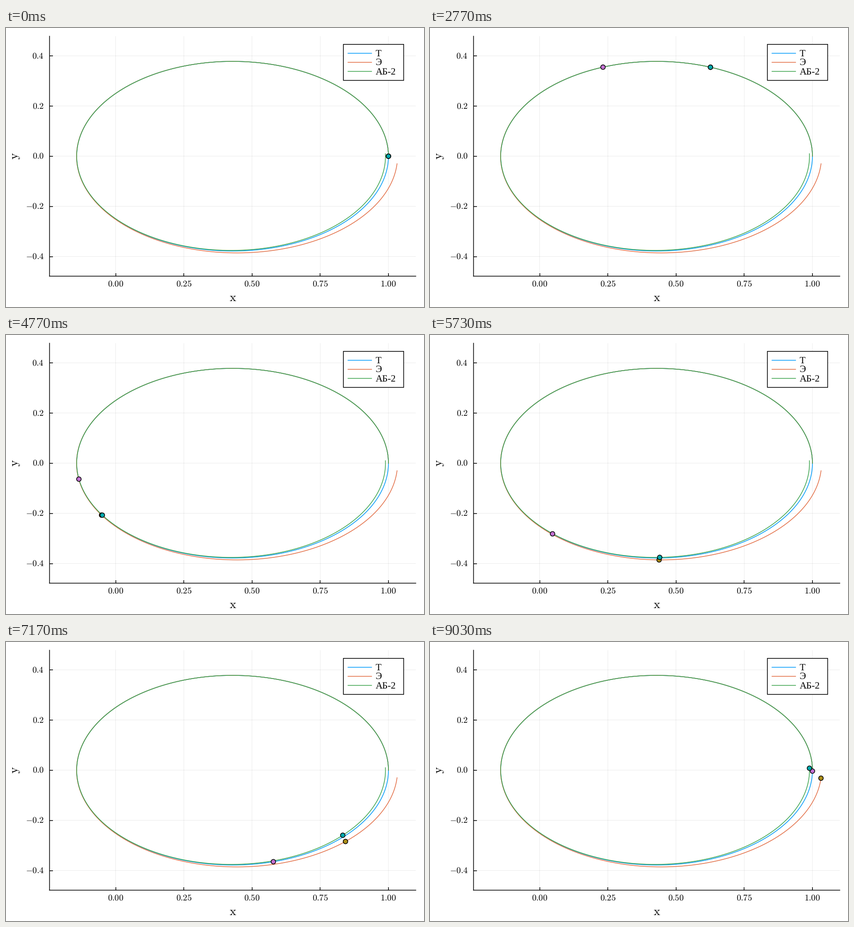
Animation, 917 px wide and 611 px high, one loop 9060 ms. Source, as a matplotlib script:

```python
import numpy as np
import matplotlib.pyplot as plt
from matplotlib.animation import FuncAnimation
from matplotlib.patches import Rectangle

W, H = 917, 611
LOOP_MS = 9060
STRIDE = 100              # integration steps per frame
DT = 1e-4
LW = 1.53

plt.rcParams.update({"mathtext.fontset": "cm", "path.snap": False,
                     "text.hinting": "none"})

# Kepler ellipse with the focus at the origin, starting at the far point
A, ECC = 4 / 7, 0.75
B = A * np.sqrt(1 - ECC**2)
PERIOD = 2 * np.pi * A**1.5
STEPS = int(PERIOD / DT)
FRAMES = STEPS // STRIDE + 1


def integrate(weight):
    """Two-step explicit scheme; weight 1 is the plain Euler method."""
    z, v = 1 + 0j, 0.5j
    path = [z]
    old_v, old_acc = v, -z / abs(z) ** 3
    for _ in range(STEPS):
        acc = -z / abs(z) ** 3
        dz = weight * v - (weight - 1) * old_v
        dv = weight * acc - (weight - 1) * old_acc
        old_v, old_acc = v, acc
        z += DT * dz
        v += DT * dv
        path.append(z)
    return np.array(path)


phase = 2 * np.pi * DT / PERIOD * np.arange(STEPS + 1)
exact = A * ECC + A * np.cos(phase) + 1j * B * np.sin(phase)
curves = [exact, integrate(1), integrate(5 / 3)]
names = ["Т", "Э", "АБ-2"]
line_colors = ["#009afa", "#e36f47", "#3ea44e"]
dot_colors = ["#c371d2", "#ac8e18", "#00aaae"]

# 72 dpi makes one point equal one pixel
fig = plt.figure(figsize=(W / 72, H / 72), dpi=72, facecolor="white")

left, right, top, bottom = 95.5, 899, 18, 543.5
ax = fig.add_axes([left / W, 1 - bottom / H, (right - left) / W, (bottom - top) / H])
for path, color in zip(curves, line_colors):
    ax.plot(path.real[::20], path.imag[::20], color=color, lw=LW)
dots = ax.scatter([1] * 3, [0] * 3, s=10**2, c=dot_colors, edgecolors="black",
                  linewidths=LW, zorder=5, clip_on=False)

xticks = [0, 0.25, 0.5, 0.75, 1]
yticks = [-0.4, -0.2, 0, 0.2, 0.4]
ax.set(xlim=(-0.2423, 1.1003), ylim=(-0.4782, 0.4782), xticks=xticks, yticks=yticks)
ax.tick_params(direction="in", length=7, width=LW, labelbottom=False, labelleft=False)
ax.grid(color="black", alpha=0.1, lw=0.76)
ax.set_axisbelow(True)
ax.spines[["top", "right"]].set_visible(False)
ax.spines[["left", "bottom"]].set_linewidth(LW)

# Overlay in pixel coordinates for labels and legend
page = fig.add_axes([0, 0, 1, 1])
page.set(xlim=(0, W), ylim=(H, 0))
page.axis("off")


def label(x, y, text, size=19.1, ha="center", **kw):
    page.text(x, y, text, size=size, ha=ha, va="baseline", color="black", **kw)


for t in xticks:
    label(240.5 + 598.5 * t, 567, f"${t:.2f}$")
for t in yticks:
    label(83.2, 287 - 549.5 * t, f"${t:.1f}$", ha="right")
label(497.3, 597.5, r"$\mathrm{x}$", size=26.3)
label(25.3, 280.5, r"$\mathrm{y}$", size=26.3, rotation=90, rotation_mode="anchor")

page.add_patch(Rectangle((740.2, 35.8), 132.2, 78.9, fc="white", ec="black", lw=LW))
for i, (name, color) in enumerate(zip(names, line_colors)):
    y = 55.4 + 19.8 * i
    page.plot([749.5, 802.8], [y, y], color=color, lw=LW, solid_capstyle="butt")
    label(811, y + 6.7, name, size=21, ha="left", family="Liberation Serif")


def update(n):
    now = [path[n * STRIDE] for path in curves]
    dots.set_offsets([(z.real, z.imag) for z in now])
    return dots,


anim = FuncAnimation(fig, update, frames=FRAMES, interval=LOOP_MS / FRAMES,
                     repeat=True, repeat_delay=0)
plt.show()
```
